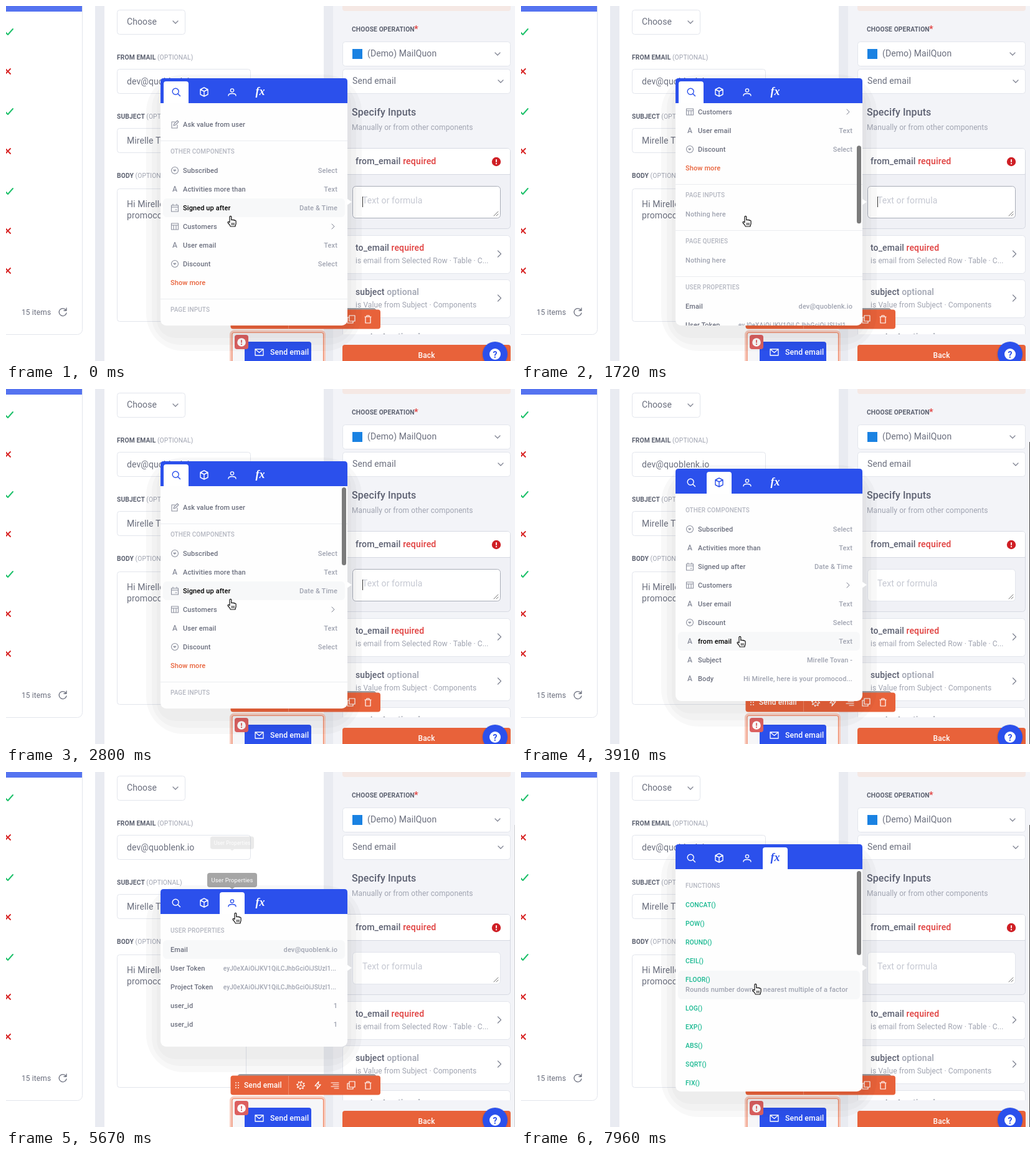
Recreate the animation shown at these times as an HTML page. Size 817 px wide and 570 px high, loop 7990 ms.

```html
<!DOCTYPE html>
<html lang="en">
<head>
<meta charset="utf-8">
<title>Value picker</title>
<style>
html, body { margin: 0; width: 100%; height: 100%; overflow: hidden; background: #fff; }
svg { display: block; font-family: Roboto, "Noto Sans", sans-serif; letter-spacing: .1px; }
</style>
</head>
<body>
<svg width="817" height="570" viewBox="0 0 817 570">
  <g id="page"></g>
  <g id="fixed"></g>
  <g id="popup"></g>
  <rect id="bar" x="816" y="85" width="1" height="485" fill="#444"/>
  <g id="hand" stroke="#111" stroke-width="1.2" stroke-linejoin="round" stroke-linecap="round">
    <path fill="#fff" d="M4 1.8c0-1.9 2.8-1.9 2.8 0v5c.4-1.2 2.4-1 2.5.2.5-1 2.5-.7 2.5.5.9-.7 2.3-.3 2.3 1v3.7c0 1.6-1.2 2.6-1.2 4.8H5.2c-.2-2.1-2.9-4.1-3.9-5.9-.9-1.6.9-2.4 1.8-1.3l.9.8z"/>
    <path stroke-width=".9" d="M7.4 11.5v3M9.3 11.5v3M11.2 11.5v3"/>
  </g>
</svg>
<script>
const LOOP = 7990;
const BLUE = '#2b50ec', ORANGE = '#e8623a', INK = '#6b6f7e', MUTED = '#a0a4b1', FAINT = '#b4b7c1',
  RED = '#e0403f', LINE = '#e2e5ec', WHITE = '#fff';
const EMAIL = 'dev@quoblenk.io', TOKEN = 'eyJ0eXAiOiJKV1QiLCJhbGciOiJSUzI1...';

const $ = id => document.getElementById(id);
const clamp = v => Math.max(0, Math.min(1, v));
const ramp = (t, from, to) => clamp((t - from) / (to - from));
const smooth = u => u * u * (3 - 2 * u);

// Drawing helpers; text is placed by its vertical centre
const rect = (x, y, w, h, fill, r = 0, extra = '') =>
  `<rect x="${x}" y="${y}" width="${w}" height="${h}" rx="${r}" fill="${fill}" ${extra}/>`;
const box = (x, y, w, h, fill = WHITE, r = 4, stroke = LINE) =>
  rect(x + .5, y + .5, w - 1, h - 1, fill, r, `stroke="${stroke}"`);
const circle = (x, y, r, fill, extra = '') => `<circle cx="${x}" cy="${y}" r="${r}" fill="${fill}" ${extra}/>`;
const text = (x, y, s, size = 11, fill = INK, weight = 400, anchor = 'start') =>
  `<text x="${x}" y="${y + size * .36}" font-size="${size}" fill="${fill}" font-weight="${weight}" text-anchor="${anchor}">${s}</text>`;
const span = (s, fill, weight = 400) => ` <tspan fill="${fill}" font-weight="${weight}">${s}</tspan>`;
const path = (d, stroke, width = 1.2, fill = 'none') =>
  `<path d="${d}" fill="${fill}" stroke="${stroke}" stroke-width="${width}" stroke-linecap="round" stroke-linejoin="round"/>`;
const at = (x, y, s) => `<g transform="translate(${x} ${y})">${s}</g>`;
const down = (x, y) => path(`M${x - 4} ${y - 2}l4 4 4-4`, '#7d8190');
const right = (x, y, s = 5, width = 1.2) => path(`M${x - s / 2} ${y - s}l${s} ${s}-${s} ${s}`, '#7d8190', width);
const bang = (x, y, r, fill, ink) => circle(x, y, r, fill) +
  rect(x - .9, y - 4, 1.8, 5, ink, .8) + circle(x, y + 3.2, 1.1, ink);

function drawTable() {
  const tick = y => path(`M-1 ${y + 1}l4 4 8-9`, '#1fc16b', 2);
  const cross = y => path(`M-1 ${y - 4}l8 8m0-8l-8 8`, '#d92a2a', 2);
  return box(-20, -20, 143, 548, WHITE, 8) + rect(0, 0, 122, 9, '#5573f0') +
    [41, 169, 297].map(tick).join('') + [105, 233, 361, 425].map(cross).join('') +
    text(25, 492, '15 items', 12) +
    path('M96 488a6 6 0 1 0 1 5M97 485v4h-4', INK, 1.3);
}

function drawForm() {
  const label = (y, s) => text(178, y, s + span('(OPTIONAL)', MUTED), 10.3, '#5c6170', 700);
  return rect(143, -10, 15, 590, '#e9ebf1') + rect(510, -10, 15, 590, '#e9ebf1') +
    box(178, 6, 110, 40) + text(194, 25, 'Choose', 14) + down(272, 26) +
    label(82, 'FROM EMAIL') + box(178, 101, 215, 40) + text(194, 121, EMAIL, 14) +
    label(177, 'SUBJECT') + box(178, 196, 215, 40) + text(194, 216, 'Mirelle Tovan', 14) +
    label(272, 'BODY') + box(178, 293, 208, 214) +
    text(194, 318, 'Hi Mirelle, here is your', 14) + text(194, 336, 'promocode', 14);
}

function drawToolbar() {
  const dots = [0, 4].map(x => [0, 4, 8].map(y => circle(369 + x, 499 + y, .9, WHITE)).join('')).join('');
  return rect(372, 485, 222, 10, '#9b9ba0', 4) + rect(360.5, 487.5, 240.5, 31, ORANGE, 4) + dots +
    text(382, 503, 'Send email', 12, WHITE, 500) + rect(453, 488, 1, 30, '#f08a68') +
    at(473, 503, circle(0, 0, 6, 'none', 'stroke="#fff" stroke-width="2" stroke-dasharray="1.6 3.1"') +
      circle(0, 0, 5, 'none', 'stroke="#fff"') + path('M0 0v-5M0 0l4.3 2.5M0 0l-4.3 2.5', WHITE, 1)) +
    at(501, 503, path('M1-6l-6 7h4l-1 5 6-7h-4z', WHITE)) +
    at(528, 503, path('M-6-4h12M-3-1h9M-6 2h12M-1 5h7', WHITE)) +
    at(554, 503, path('M-3-6h9v9h-9zM-3-3h-3v9h9v-3', WHITE)) +
    at(581, 503, path('M-5-4h10M-2-4v-2h4v2M-4-4v10h8v-10', WHITE));
}

function drawPanel() {
  const input = (y, name, kind, fill, note) => box(540, y, 270, 62, WHITE, 5) +
    text(561, y + 20, name + span(kind, fill, 500), 14, '#5d6172', 500) +
    text(561, y + 41, note, 12, MUTED) + right(792, y + 30);
  return rect(525, -10, 292, 590, '#f3f4f8') + rect(540, -12, 270, 20, '#f5e8e4', 4) +
    text(555, 37, 'CHOOSE OPERATION', 10.3, '#5c6170', 700) + text(655, 37, '*', 15, RED, 500) +
    box(540, 57, 270, 40) + rect(556, 69, 16, 16, '#1a82e2') +
    text(580, 76, '(Demo) MailQuon', 14) + down(789, 77) +
    box(540, 101, 270, 40) + text(556, 120, 'Send email', 14) + down(794, 121) +
    text(555, 170, 'Specify Inputs', 16, '#5d6172', 500) +
    text(555, 195, 'Manually or from other components', 12, MUTED) +
    box(540, 228, 270, 130, '#f0f1f6', 5, '#d6d9e2') + rect(541, 229, 268, 42, WHITE, 4) +
    rect(541, 270, 268, 1, '#d6d9e2') +
    text(561, 249, 'from_email' + span('required', RED, 500), 14.2, '#5d6172', 500) +
    bang(787, 250, 7.2, '#cf1f25', WHITE) +
    `<rect id="field" x="556.5" y="289.5" width="237" height="51" rx="5" fill="#fff"/>` +
    text(572, 312, 'Text or formula', 14, '#c5c8d2') + path('M783 337l7-7M787 337l3-3', '#777', 1) +
    `<rect id="caret" x="572" y="306" width="1" height="17" fill="#333"/>` +
    input(368, 'to_email', 'required', RED, 'is email from Selected Row · Table · C...') +
    input(439, 'subject', 'optional', MUTED, 'is Value from Subject · Components') +
    input(511, 'content', 'optional', MUTED, '');
}

function drawFixed() {
  return rect(526, 527, 291, 43, '#f3f4f8') +
    rect(361, 522.5, 150, 60, '#f6f6f8', 5, 'stroke="#f8cbbd" stroke-width="4"') +
    rect(363, 524.5, 146.5, 60, 'none', 3, 'stroke="#ee8462" stroke-width="1.2"') +
    rect(383, 539, 107, 40, BLUE, 4) +
    path('M400 551h13v10h-13zl6.5 5.5 6.5-5.5', WHITE, 1.3) +
    text(424, 556, 'Send email', 12.3, WHITE, 500) +
    rect(367, 528, 22, 23, '#dc6060', 4) + bang(378, 540, 6.8, WHITE, '#dc6060') +
    rect(540, 544, 270, 40, ORANGE, 4) + text(675, 561, 'Back', 12, WHITE, 500, 'middle') +
    circle(785, 560, 22, 'rgba(0,0,0,.06)') + circle(785, 559, 20, BLUE) + circle(785, 559, 9, WHITE) +
    text(785, 559.5, '?', 14, BLUE, 700, 'middle');
}

const ROW_ICONS = {
  select: circle(0, 0, 5.5, 'none', 'stroke="#8c909e" stroke-width="1.1"') + path('M-2-.8h4l-2 2z', '#8c909e', 1, '#8c909e'),
  text: text(0, 0, 'A', 12, '#8c909e', 500, 'middle'),
  date: path('M-5.5-4h11v10h-11zM-5.5-1h11M-3-6v2M3-6v2M1 3h2', '#8c909e', 1.1),
  table: path('M-5.5-5h11v10h-11zM-5.5-2h11M-2-2v7M2-2v7', '#8c909e', 1.1),
  edit: path('M0-4h-5v10h9v-5M-2 2l1-3 5-5 2 2-5 5z', '#8c909e', 1.1)
};
const COMPONENTS = [
  ['select', 'Subscribed', 'Select'], ['text', 'Activities more than', 'Text'],
  ['date', 'Signed up after', 'Date &amp; Time'], ['table', 'Customers', '>'],
  ['text', 'User email', 'Text'], ['select', 'Discount', 'Select']
];
const FORM_FIELDS = [
  ['text', 'from email', 'Text'], ['text', 'Subject', 'Mirelle Tovan -'],
  ['text', 'Body', 'Hi Mirelle, here is your promocod...']
];
const USER = [
  ['', 'Email', EMAIL], ['', 'User Token', TOKEN, 10], ['', 'Project Token', TOKEN, 10],
  ['', 'user_id', '1'], ['', 'user_id', '1']
];
const FUNCTIONS = [
  ['CONCAT', 'Joins several text values into one'], ['POW', 'Number raised to a power'],
  ['ROUND', 'Rounds number to a number of places'], ['CEIL', 'Rounds number up to nearest multiple of a factor'],
  ['FLOOR', 'Rounds number down to nearest multiple of a factor'],
  ['LOG'], ['EXP'], ['ABS'], ['SQRT'], ['FIX']
];

const title = (y, s) => text(264, y, s, 10, FAINT, 500);
const divider = y => rect(248, y, 300, 1, '#eaecf0');
const thumb = (y, h) => rect(539, y, 7, h, '#7b7b7b', 3.5);
const glow = (y, h = 30) => rect(252, y, 292, h, '#f7f8f9', 6);

function row(y, [icon, label, value, size = 11], hovered) {
  return (icon ? at(271, y, ROW_ICONS[icon]) : '') +
    text(icon ? 284 : 264, y, label, 11, hovered ? '#000' : INK, 500) +
    (value === '>' ? right(525, y, 4, 1) : text(size < 11 ? 530 : 532, y, value || '', size, MUTED, 500, 'end'));
}
function rows(y, items, hover) {
  return (hover === undefined ? '' : glow(y - 15 + 30 * Math.max(hover, 0))) +
    items.map((item, i) => row(y + 30 * i, item, i === hover)).join('');
}

function searchList(scroll, showThumb) {
  const empty = (y, s) => divider(y) + title(y + 17, s) + text(264, y + 48, 'Nothing here', 11, MUTED, 500);
  return at(0, -scroll, row(190, ['edit', 'Ask value from user']) + divider(216) +
    title(233, 'OTHER COMPONENTS') + rows(264, COMPONENTS, 2) +
    text(264, 444, 'Show more', 11, ORANGE, 500) +
    empty(470, 'PAGE INPUTS') + empty(544, 'PAGE QUERIES') +
    divider(618) + title(635, 'USER PROPERTIES') + rows(666, USER)) +
    (showThumb ? thumb(158 + scroll * .36, 125) : '');
}

function functionList(tip, showThumb) {
  const hover = Math.max(0, Math.floor((tip - 214) / 30));
  return title(182, 'FUNCTIONS') + glow(199 + 30 * hover, 46) +
    FUNCTIONS.map(([name, note], i) => {
      const y = 213 + 30 * i + (i > hover ? 16 : 0);
      return text(264, y, name + '()', 10.4, '#17b890', 500) +
        (i === hover ? text(264, y + 16, note, 11, MUTED, 500) : '');
    }).join('') + (showThumb ? thumb(159, 135) : '');
}

const TAB_ICONS = [
  c => circle(-.8, -.8, 5, 'none', `stroke="${c}" stroke-width="1.4"`) + path('M3 3l3.5 3.5', c, 1.5),
  c => path('M0-7l6 3v8l-6 3-6-3v-8zM-6-4l6 3 6-3M0-1v8', c, 1.4),
  c => circle(0, -2.5, 2.6, 'none', `stroke="${c}" stroke-width="1.4"`) + path('M-6 6c0-4.6 12-4.6 12 0', c, 1.4),
  c => `<text y="5" font-size="18" font-weight="700" font-style="italic" text-anchor="middle" fill="${c}" style="font-family:'Liberation Serif',serif">fx</text>`
];

// Top and bottom of the popup for each tab
const LAYOUT = [[116, 513], [128, 501], [188, 441], [116, 513]];

function drawPopup(tab, content) {
  const [top, bottom] = LAYOUT[tab];
  const shadow = [[23, 41, 60, .028], [14, 31, 45, .022], [6, 20, 30, .02]]
    .map(([side, drop, r, a]) => rect(248 - side, top + 17 - side, 300 + 2 * side, bottom + drop - top - 17 + side, '#000', r, `opacity="${a}"`)).join('');
  const tabs = TAB_ICONS.map((icon, i) => {
    const x = 273 + 45 * i, on = i === tab;
    return (on ? path(`M${x - 20} ${top + 40}v-31q0-4 4-4h32q4 0 4 4v31z`, 'none', 0, WHITE) : '') +
      at(x, top + 22, icon(on ? BLUE : WHITE));
  }).join('');
  return shadow + path('M547 309l8 5.5-8 5.5z', 'none', 0, WHITE) +
    `<clipPath id="frame">${rect(248, top, 300, bottom - top, WHITE, 9)}</clipPath><g clip-path="url(#frame)">` +
    rect(248, top, 300, bottom - top, '#fefefe') + content + '</g>' +
    path(`M248 ${top + 40}v-35q0-5 5-5h290q5 0 5 5v35z`, 'none', 0, BLUE) + tabs;
}

function tooltip(x, top, label, width, opacity, scale = 1) {
  if (opacity <= 0) return '';
  return `<g opacity="${opacity}" transform="translate(${x} ${top - 14}) scale(${scale})">` +
    rect(-width / 2, -12, width, 23, '#555', 4) + path('M-4 11h8l-4 3z', 'none', 0, '#555') +
    text(0, -.5, label, 9.5, WHITE, 400, 'middle') + '</g>';
}

// Pointer moves: start, end, x, y
const MOVES = [
  [3010, 3010, 347, 367], [3510, 3670, 346, 397], [4820, 5120, 362, 148], [5490, 5640, 363, 226],
  [6330, 6600, 368, 380], [6680, 7040, 408, 205], [7500, 7700, 371, 340]
];
function pointer(t) {
  let x = 355, y = 337;
  for (const [from, to, nx, ny] of MOVES) {
    if (t < from) break;
    const u = to > from ? smooth(ramp(t, from, to)) : 1;
    x += (nx - x) * u;
    y += (ny - y) * u;
  }
  return [x, y];
}

const fling = u => 1 - (1 - u) ** 2;
const scrollAt = t => 237 * (fling(ramp(t, 1300, 2096)) - fling(ramp(t, 2096, 2800)));

function bounce(t) {
  const u = ramp(t, 3910, 4680);
  return -Math.round(12 * u * (1 - u) ** 2);
}

function popupAt(t, tip) {
  const tab = t < 3010 ? 0 : t < 5150 ? 1 : t < 7130 ? 2 : 3;
  const top = LAYOUT[tab][0];
  const hovered = n => {
    const i = Math.floor((tip - top - 82) / 30);
    return i >= 0 && i < n ? i : -1;
  };
  if (tab === 0) return drawPopup(0, searchList(Math.round(scrollAt(t)), t >= 1300));
  if (tab === 3) return drawPopup(3, functionList(tip, t >= 7960));
  const items = tab === 1 ? COMPONENTS.concat(FORM_FIELDS) : USER;
  const leave = 1 - ramp(t, 5490, 5695);
  return drawPopup(tab, title(top + 66, tab === 1 ? 'OTHER COMPONENTS' : 'USER PROPERTIES') +
      rows(top + 97, items, hovered(items.length))) +
    tooltip(363, 128, 'User Properties', 80, ramp(t, 5080, 5250) * leave, 1 - .14 * (1 - leave)) +
    tooltip(363, 188, 'User Properties', 80, ramp(t, 5585, 5750) * (1 - ramp(t, 6330, 6480))) +
    tooltip(408, 188, 'Formulas', 62, ramp(t, 6960, 7100));
}

$('page').innerHTML = drawTable() + drawForm() + drawPanel() + drawToolbar();
$('fixed').innerHTML = drawFixed();
let shown = '';

function render(now) {
  const t = now % LOOP;
  const [x, y] = pointer(t);
  const markup = popupAt(t, y);
  if (markup !== shown) $('popup').innerHTML = shown = markup;
  const shift = `translate(0 ${bounce(t)})`;
  $('page').setAttribute('transform', shift);
  $('popup').setAttribute('transform', shift);
  $('hand').setAttribute('transform', `translate(${x} ${y})`);
  const focused = t < 3010;
  $('field').setAttribute('stroke', focused ? '#a9adb8' : LINE);
  $('caret').setAttribute('opacity', focused && Math.floor((t + 305) / 475) % 2 === 0 ? 1 : 0);
  $('bar').setAttribute('opacity', t >= 7960 ? 1 : t < 3910 ? 0 : 1 - ramp(t, 5490, 5720));
  requestAnimationFrame(render);
}
render(performance.now());
</script>
</body>
</html>
```
